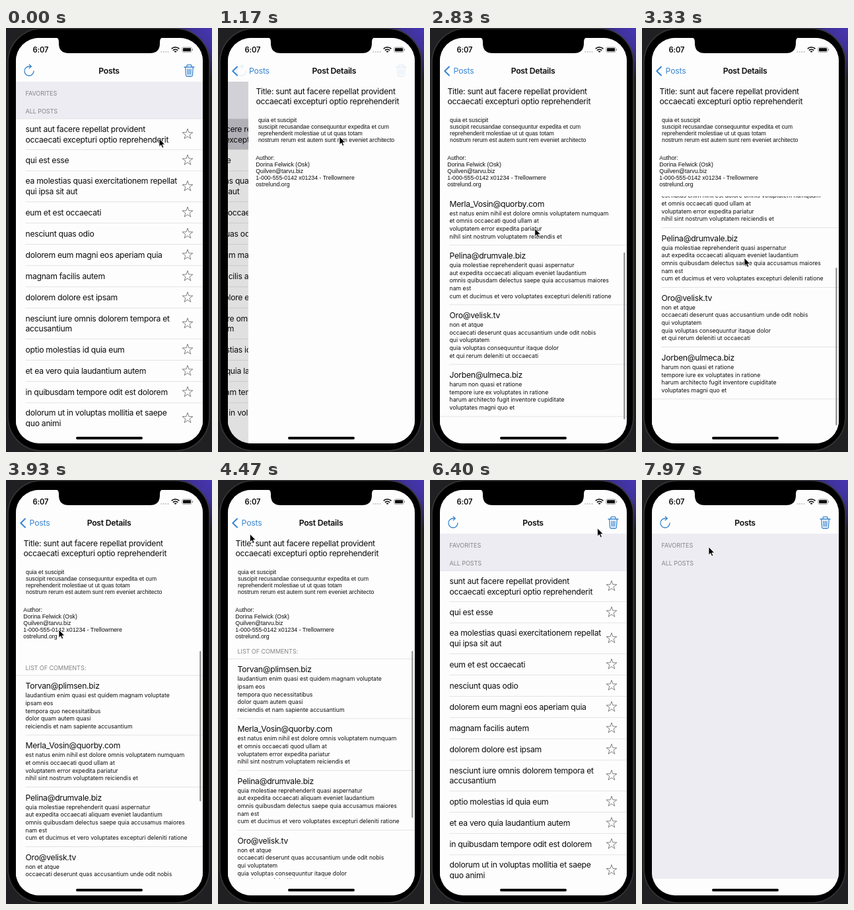
Write an HTML page that moves like this. It is 312 by 640 pixels and loops after 8 s.

```html
<!DOCTYPE html>
<html lang="en">
<head>
<meta charset="utf-8">
<title>Posts</title>
<style>
  html, body { margin: 0; width: 100%; height: 100%; overflow: hidden; background: #202022; }
  svg { display: block; width: 312px; height: 640px; }
  text { font-family: Inter, sans-serif; fill: #0c0c0c; white-space: pre; }
  .row { font-size: 12.2px; letter-spacing: -.27px; }
  .note { font-size: 8.7px; }
  .plain { font: 8.8px "Liberation Sans", Arial, sans-serif; }
  .section { font-size: 9.1px; letter-spacing: -.1px; fill: #858589; }
  .nav { font-size: 12.3px; font-weight: 600; letter-spacing: -.3px; text-anchor: middle; }
  .back { font-size: 12.3px; letter-spacing: -.25px; text-anchor: middle; fill: #3a86d0; }
  .clock { font-size: 11.2px; font-weight: 600; letter-spacing: -.1px; }
  .icon { fill: none; stroke: #3a86d0; stroke-width: 1.3; stroke-linecap: round; stroke-linejoin: round; }
  .star { fill: none; stroke: #727276; stroke-width: .9; stroke-linejoin: round; }
  .line { stroke: #dedee2; stroke-width: .8; }
  .page { fill: #fdfdfd; }
  .group { fill: #ececf2; }
</style>
</head>
<body>
<svg viewBox="0 0 312 640">
  <defs>
    <radialGradient id="wall" gradientUnits="userSpaceOnUse" cx="312" cy="0" r="75">
      <stop offset="0" stop-color="#4636b4"/><stop offset=".4" stop-color="#4636b4" stop-opacity=".8"/>
      <stop offset="1" stop-color="#4636b4" stop-opacity="0"/>
    </radialGradient>
    <clipPath id="screen"><rect x="15" y="15" width="283" height="612" rx="35"/></clipPath>
    <clipPath id="listArea"><rect x="15" y="81" width="283" height="521"/></clipPath>
    <clipPath id="tableArea"><rect x="15" y="254" width="283" height="348"/></clipPath>
  </defs>

  <rect width="312" height="640" fill="#202022"/>
  <rect width="312" height="640" fill="url(#wall)"/>
  <rect x="3" y="1" width="305" height="637" rx="51" fill="#000" stroke="#363638" stroke-width="1.6"/>

  <g clip-path="url(#screen)">
    <rect class="page" x="15" y="15" width="283" height="613"/>
    <g id="list">
      <g clip-path="url(#listArea)">
        <rect class="group" x="15" y="81" width="283" height="521"/>
        <g id="posts"></g>
        <text class="section" x="29.5" y="102.3">FAVORITES</text>
        <text class="section" x="29.5" y="129.3">ALL POSTS</text>
      </g>
    </g>
    <rect id="dim" x="15" y="81" width="283" height="547"/>

    <g id="detail">
      <rect class="page" x="15" y="81" width="283" height="547"/>
      <g id="summary"></g>
      <g id="table" clip-path="url(#tableArea)">
        <g id="comments"></g>
        <rect id="bar" x="293.3" width="2.2" rx="1.1" fill="#8c8c8e"/>
      </g>
    </g>

    <rect class="page" x="15" y="15" width="283" height="66"/>
    <g id="listIcons" class="icon">
      <path d="M42 65a7 7 0 1 1-7-7h3M35.2 55.2l3.2 2.8-3.2 2.8"/>
      <path d="M270 59h15M274 59v-2.4q0-1 1-1h5q1 0 1 1v2.4M271.7 59l.9 12.5q.1 1.5 1.6 1.5h6.6q1.5 0 1.6-1.5l.9-12.5M275 62l.3 8M277.5 62v8M280 62l-.3 8"/>
    </g>
    <path id="chevron" class="icon" style="stroke-width:2" d="M29 58.5l-6.7 6.5 6.7 6.5"/>
    <text id="listTitle" class="nav" y="69.3">Posts</text>
    <text id="backLabel" class="back" y="69.3">Posts</text>
    <text id="detailTitle" class="nav" y="69.3">Post Details</text>

    <text class="clock" x="40.5" y="37">6:07</text>
    <path d="M234.5 36h12" stroke="#b8b8ba" stroke-width="1.6" stroke-dasharray="1.8 1.6"/>
    <g fill="none" stroke="#0c0c0c" stroke-width="1.7">
      <path d="M250.8 31.3a8.4 8.4 0 0 1 11.6 0M253 33.8a5.2 5.2 0 0 1 7.2 0"/>
      <path d="M255.3 36a2 2 0 0 1 2.6 0" stroke-width="2"/>
      <rect x="266.7" y="29" width="14.6" height="7.6" rx="2.2" stroke="#8c8c8e" stroke-width=".8"/>
    </g>
    <rect x="268" y="30.3" width="12" height="5" rx="1.1" fill="#0c0c0c"/>
    <path d="M282.6 31.6v2.4" stroke="#8c8c8e"/>
    <rect x="106" y="617" width="101" height="4" rx="2" fill="#000"/>
  </g>
  <path d="M74 14q6 0 6 7v2q0 15 15 15h123q15 0 15-15v-2q0-7 6-7z" fill="#000"/>
  <path id="cursor" d="M0 0v12.2l2.8-2.6 1.9 4.4 2.1-.9-1.9-4.2h3.8z" fill="#000" stroke="#fff" stroke-width=".8"/>
</svg>
<script>
const $ = id => document.getElementById(id);
const LOOP = 8000, WIDTH = 283;

const posts = [
  'sunt aut facere repellat provident|occaecati excepturi optio reprehenderit',
  'qui est esse',
  'ea molestias quasi exercitationem repellat|qui ipsa sit aut',
  'eum et est occaecati',
  'nesciunt quas odio',
  'dolorem eum magni eos aperiam quia',
  'magnam facilis autem',
  'dolorem dolore est ipsam',
  'nesciunt iure omnis dolorem tempora et|accusantium',
  'optio molestias id quia eum',
  'et ea vero quia laudantium autem',
  'in quibusdam tempore odit est dolorem',
  'dolorum ut in voluptas mollitia et saepe|quo animi'
];
const comments = [
  'Torvan@plimsen.biz|laudantium enim quasi est quidem magnam voluptate|ipsam eos|tempora quo necessitatibus|dolor quam autem quasi|reiciendis et nam sapiente accusantium',
  'Merla_Vosin@quorby.com|est natus enim nihil est dolore omnis voluptatem numquam|et omnis occaecati quod ullam at|voluptatem error expedita pariatur|nihil sint nostrum voluptatem reiciendis et',
  'Pelina@drumvale.biz|quia molestiae reprehenderit quasi aspernatur|aut expedita occaecati aliquam eveniet laudantium|omnis quibusdam delectus saepe quia accusamus maiores|nam est|cum et ducimus et vero voluptates excepturi deleniti ratione',
  'Oro@velisk.tv|non et atque|occaecati deserunt quas accusantium unde odit nobis|qui voluptatem|quia voluptas consequuntur itaque dolor|et qui rerum deleniti ut occaecati',
  'Jorben@ulmeca.biz|harum non quasi et ratione|tempore iure ex voluptates in ratione|harum architecto fugit inventore cupiditate|voluptates magni quo et'
];

// Stacked lines of text; y is the baseline of the first one.
const lines = (cls, x, y, step, list) =>
  list.map((s, i) => `<text class="${cls}" x="${x}" y="${y + i * step}">${s}</text>`).join('');
const rule = (y, x = 29.5) => `<path class="line" d="M${x} ${y}H298"/>`;

function star(cx, cy) {
  const points = Array.from({ length: 10 }, (_, i) => {
    const r = i % 2 ? 3.3 : 8.3, a = i * Math.PI / 5;
    return `${cx + r * Math.sin(a)},${cy - r * Math.cos(a)}`;
  });
  return `<polygon class="star" points="${points.join(' ')}"/>`;
}

function buildPosts() {
  let y = 137;
  let html = '<rect class="page" x="15" y="137" width="283" height="465"/>' +
    '<rect id="selected" x="15" y="137" width="283" height="46.5" fill="#c8c7ce"/>' + rule(y, 15);
  for (const post of posts) {
    const text = post.split('|'), height = text.length > 1 ? 46.6 : 32.1;
    const middle = y + height / 2;
    html += lines('row', 29.5, middle + 4.3 - (text.length - 1) * 7.9, 15.8, text) + star(275, middle);
    y += height;
    html += rule(y);
  }
  return html;
}

function buildComments() {
  let y = 270;
  let html = lines('section', 29.5, 262.3, 0, ['LIST OF COMMENTS:']) + rule(y, 15);
  comments.forEach((comment, i) => {
    const [author, ...body] = comment.split('|');
    html += lines('row', 29.5, y + 20.3, 0, [author]) + lines('note', 29.5, y + 33.3, 11.65, body);
    y += 31.8 + 11.65 * body.length;
    html += rule(y, i === comments.length - 1 ? 15 : 29.5);
  });
  return html;
}

$('posts').innerHTML = buildPosts();
$('comments').innerHTML = buildComments();
$('summary').innerHTML =
  lines('row', 26.5, 99.8, 14.9, ['Title: sunt aut facere repellat provident', 'occaecati excepturi optio reprehenderit']) +
  lines('plain', 30, 142.3, 10.05, ['quia et suscipit', 'suscipit recusandae consequuntur expedita et cum',
    'reprehenderit molestiae ut ut quas totam', 'nostrum rerum est autem sunt rem eveniet architecto']) +
  lines('plain', 26.3, 199, 10.05, ['Author:', 'Dorina Felwick (Osk)', 'Quilven@tarvu.biz',
    '1-000-555-0142 x01234 - Trellowmere', 'ostrelund.org']);

const clamp = v => Math.min(1, Math.max(0, v));
const ramp = (t, start, length) => clamp((t - start) / length);
const easeOut = v => 1 - (1 - v) ** 3;

// Smooth interpolation through [time, ...values] keys.
function track(keys, t) {
  const next = keys.findIndex(k => k[0] > t);
  if (next < 0) return keys.at(-1).slice(1);
  const a = keys[Math.max(0, next - 1)], b = keys[next];
  const v = ramp(t, a[0], b[0] - a[0] || 1), s = v * v * (3 - 2 * v);
  return a.slice(1).map((n, i) => n + (b[i + 1] - n) * s);
}

const cursorKeys = [
  [0, 232, 167], [900, 232, 167], [1170, 184, 164], [1800, 168, 365], [2150, 166, 367],
  [2370, 164, 337], [2700, 160, 270], [3000, 157, 350], [3330, 155, 347], [3930, 80, 226],
  [4600, 45, 66], [4950, 45, 66], [5200, 79, 115], [5700, 90, 120], [6600, 277, 66],
  [7100, 277, 66], [7970, 101, 101], [8000, 101, 101]
];
const scrollKeys = [
  [0, 0], [2150, 0], [2370, 29], [2800, 110], [3150, 142], [3330, 137],
  [3800, -29], [3930, -25], [4300, 0]
];
const MAX_SCROLL = 123;

function draw(t) {
  const push = easeOut(ramp(t, 910, 500)) - easeOut(ramp(t, 4962, 500));
  const [scroll] = track(scrollKeys, t);
  const inside = Math.min(MAX_SCROLL, Math.max(0, scroll));
  const over = scroll - inside;
  const show = (id, opacity) => $(id).setAttribute('opacity', opacity);
  const move = (id, x, y = 0) => $(id).setAttribute('transform', `translate(${x} ${y})`);

  move('list', -85 * push);
  move('detail', WIDTH * (1 - push));
  move('comments', 0, -scroll);
  move('cursor', ...track(cursorKeys, t));
  show('dim', .12 * Math.sqrt(push));
  show('selected', ramp(t, 830, 40) - ramp(t, 5350, 350));
  show('posts', 1 - ramp(t, 6950, 300));
  show('table', ramp(t, 1450, 40));

  $('bar').setAttribute('y', 258 + .73 * inside + Math.max(0, over));
  $('bar').setAttribute('height', 252 - Math.abs(over));
  show('bar', ramp(t, 2150, 100) - ramp(t, 4450, 250));

  const label = 156 - 105 * push;
  $('listTitle').setAttribute('x', label);
  $('backLabel').setAttribute('x', label);
  $('detailTitle').setAttribute('x', 156 + 182 * (1 - push));
  show('listTitle', clamp(1.4 - 2 * push));
  show('backLabel', clamp(2 * push - .6));
  show('detailTitle', clamp(2 * push - .6));
  show('listIcons', clamp(1.15 - push * 1.15));
  show('chevron', clamp(push * 1.2 - .05));
}

function frame() {
  draw(performance.now() % LOOP);
  requestAnimationFrame(frame);
}
frame();
</script>
</body>
</html>
```
